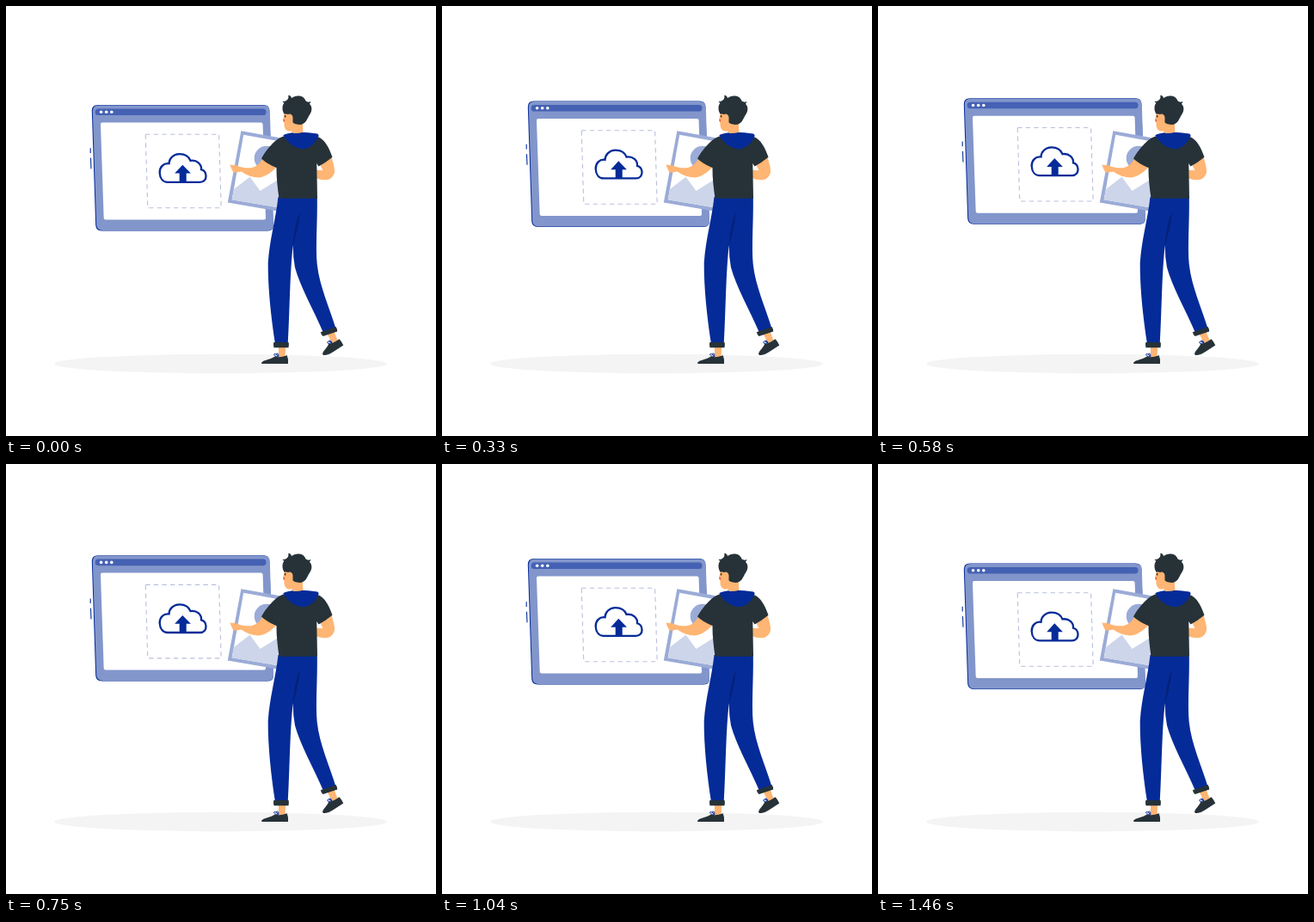
Recreate the animation shown at these times as an HTML page. Size 500 by 500 pixels, loop 1500 ms.

```html
<!DOCTYPE html>
<html lang="en">
<head>
<meta charset="utf-8">
<title>Upload</title>
<style>
  html, body { margin: 0; width: 100%; height: 100%; overflow: hidden; background: #fff; }
  svg { display: block; width: 100%; height: 100%; }
  .navy { fill: #052b98; }
  .dark { fill: #263238; }
  .skin { fill: #ffb573; }
  .line { fill: none; stroke: #052b98; }
</style>
</head>
<body>
<svg viewBox="0 0 500 500">
  <ellipse cx="249.5" cy="416" rx="193.5" ry="11.2" fill="#f4f4f4"/>

  <g id="screen">
    <path class="navy" d="M107 115.6H299.500Q306 115.600 306.300 122L310.700 255.500Q311 262 304.500 262H111.500Q104.700 262 104.200 255.500L99.800 122.500Q99.600 115.600 107 115.600Z"/>
    <path fill="#8296cc" d="M108 116H300Q306.500 116 306.800 122.500L311 255Q311.200 261.500 305 261.500H112.500Q105.700 261.500 105.200 255L100.800 123Q100.600 116 108 116Z"/>
    <rect x="103.700" y="120" width="198.800" height="7.600" rx="3.600" fill="#4461b3"/>
    <g fill="#fff">
      <circle cx="110.600" cy="123.800" r="1.800"/>
      <circle cx="116.700" cy="123.800" r="1.800"/>
      <circle cx="122.800" cy="123.800" r="1.800"/>
      <path d="M112 136H296.500Q298.500 136 298.600 138L302 247Q302 249 300 249H116Q113.800 249 113.700 247L110 138Q110 136 112 136Z"/>
    </g>
    <path class="line" d="M98.200 165.800V171.500M98.500 177.200L99 189.800" stroke-width="1.100"/>
    <path fill="none" stroke="#b9c0de" stroke-width="1.100" stroke-dasharray="5.400 4.200" d="M162.200 149.800H247.600L250.200 235.300H164.800Z"/>
    <path class="line" stroke-width="2.300" d="M188 205.400H225.500C230.500 205.400 232.800 201.800 232.500 197.800C232.200 194 229.800 191.500 227 190.800C227.700 184.500 222 179.300 214.500 180.500C212.500 175.300 207.200 172.600 201.500 172.700C194.500 173 189.800 177.700 189.500 183.800C183 183 178.500 188 178.700 194.500C179 201 182.500 205.400 188 205.400Z"/>
    <path class="navy" d="M205.300 185.300L214.900 195.200H209.700V205H201.700V195.200H196.200Z"/>
  </g>

  <g id="photo">
    <path fill="#9babd7" d="M273.400 145.200L345 158L330 241L257.800 228.600Z"/>
    <path fill="#fff" d="M276.200 149.800L341 161.500L327 236L262.700 225.300Z"/>
    <circle cx="303" cy="177" r="14.300" fill="#9babd7"/>
    <path fill="#cdd5ea" d="M265 213L283.600 198.800L295.500 215L318 201V234.600L262.700 225.300Z"/>
  </g>

  <g id="legs">
    <path class="skin" d="M317 395H325.200L324.600 409H317ZM373.500 381L381.500 378L385.500 389L379 392Z"/>
    <path class="dark" d="M297.200 414.500C300 411.500 307 411.300 313.300 407.300Q317 409.500 326.800 406.300Q328.500 410.500 328 416H298Q296.800 416 297.200 414.500Z"/>
    <path class="dark" d="M368 404.500C369 400 373.500 398 375.300 392.500Q380 392.500 387.500 387.200Q390.500 390 392.300 394.500L381.500 401.500Q374 406.500 369 406Z"/>
    <path class="line" stroke-width=".9" d="M317 408Q311 407 311.500 405T317 407.500Q313 404.500 315 403.800T317 407.500M379 391.500Q373.500 393.500 373.800 391T379 391.500Q374.500 390 376 389T379 391.500"/>
    <path class="navy" d="M361.800 222C362.300 250 359.800 280 361.700 300C364.500 326 376 350 383.500 375L369.500 381C357 352 342 326 336 304Q333.700 292 333.700 278C330 310 330 352 327.700 393H313C308 361 304.500 327 304.700 299C306.500 271 313.500 249 316.500 222Z"/>
    <path fill="#04217a" d="M342 239Q335 255 333.700 279Q339.500 260 342 239Z"/>
    <path class="dark" d="M311.300 391H328.600Q329.300 394 328.500 397.200H311.500Q310.600 394 311.300 391ZM365.800 379.200L383.600 373Q385.300 375.500 385.200 378.600L368.600 384Q366.500 382.300 365.800 379.200Z"/>
  </g>

  <g id="torso">
    <path class="skin" d="M300 175C295 183 291.500 187 285 188.200C279 188.700 272 187.500 267.500 185.200L260.500 184.500Q261.500 188.500 264.500 193.500Q269 193.800 273.500 192.500C280 197 287 199.500 294 199.500C303 198.500 310 192 316 186Z"/>
    <path class="skin" d="M364 182L378.500 176C380.500 182 382.500 189 382 193.500C380.500 199.500 376.500 202 371.500 202.300Q366 202.500 360 200V190.500L368.500 191.300Z"/>
    <path class="dark" d="M323 151.500C313 154 302 168 297 177.500Q304 184 314.500 188C314.300 200 316 213 317.500 223.700H362L361.300 183L363.500 186.500Q372 182 379.500 175.800C376 166 371 154.500 362 152Z"/>
    <path class="navy" d="M322.300 150.500Q324 148.500 333 147.300Q345 145.700 362 148.400Q364.500 150 363 152.500C359 161 352 166 345 166.200C336 165.500 328.500 160.500 322.300 150.500Z"/>
  </g>

  <g id="head">
    <path class="skin" d="M324 121Q323.500 127 322 132.500Q321.800 134.200 323.500 134.500C323 141 324.500 146.500 332.500 145.500L334 148Q340 148.300 345.500 146.800L344.500 130L336 117Z"/>
    <path class="dark" d="M323.500 125.500C321 122 320.600 116 323.500 112.500Q321.800 112.300 321.600 111Q324.500 111.300 326.500 109.500Q329 108 328.300 103.800Q331.500 104 332 107Q336 103.800 341 104.600Q346.500 105.200 348.800 110.800Q352 112.500 354.500 110.700Q354 113 352.800 113.700C356.500 117 356 122.500 353 126.500C350 131 349 138 341 138Q335 137.500 332.300 134.500L331.500 127Q328 125 323.500 125.500Z"/>
    <path class="skin" d="M333.500 129.500C333 125 327.500 124 327 128.500C326.800 133 329.500 136.500 333.500 135.500Z"/>
    <path class="dark" d="M323.800 127H325.300V129.500H324Z"/>
    <path fill="#e85c45" d="M322.500 131.500L324 132V135L322.700 134.500Z"/>
  </g>
</svg>
<script>
  const LOOP = 1500, LIFT = 10, PHASE = 43;
  const screenGroup = document.getElementById('screen');

  // The screen floats up and down at constant speed.
  function draw() {
    const phase = (performance.now() + PHASE) % LOOP / LOOP;
    const lift = LIFT * (1 - Math.abs(1 - 2 * phase));
    screenGroup.setAttribute('transform', `translate(0 ${-lift})`);
    requestAnimationFrame(draw);
  }
  draw();
</script>
</body>
</html>
```
